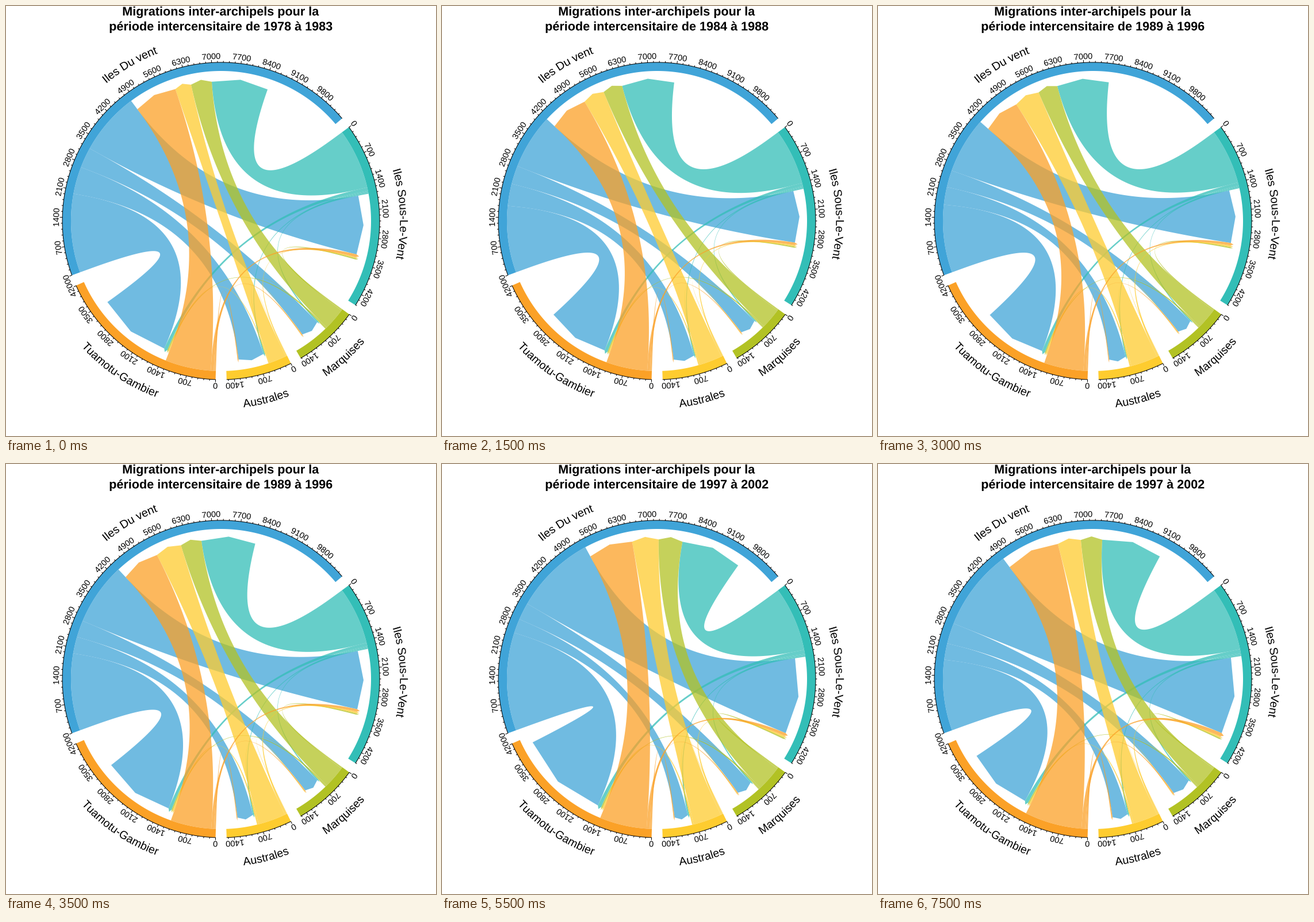
These frames come from a looping animation (748x748 px, 8000 ms). A matplotlib script:

```python
import numpy as np
import matplotlib.pyplot as plt
from matplotlib.animation import FuncAnimation
from matplotlib.collections import LineCollection
from matplotlib.patches import PathPatch
from matplotlib.path import Path
from matplotlib.textpath import TextPath

SIZE, MID = 748, 374
R_OUT, R_IN, R_SHOULDER, R_TIP = 276, 261, 242.8, 248
START, GAP = 200, 4
STEPS = 5  # frames from one census period to the next
SHARE = 0.0145  # pull of a sector on movers between outer islands, per thousand
FONT = "Liberation Sans"

NAMES = ["Iles Du vent", "Iles Sous-Le-Vent", "Marquises", "Australes", "Tuamotu-Gambier"]
COLORS = ["#40A4D8", "#33BEB7", "#B2C224", "#FECC2F", "#FBA127"]
THOUSANDS = np.array([10.49, 4.485, 1.564, 1.583, 4.205])
PERIODS = ["1978 à 1983", "1984 à 1988", "1989 à 1996", "1997 à 2002"]

# Flows with the hub (first sector) in degrees: sector -> value per period.
TO_HUB = {1: (23.3, 20.4, 25.1, 24.8), 2: (8.6, 7.6, 10.1, 8.8),
          3: (6.7, 10.2, 11.3, 9.6), 4: (17.7, 14.8, 17.3, 22.1)}
FROM_HUB = {1: (24.3, 19.3, 31.3, 31.6), 2: (7.9, 6.6, 6.3, 8.0),
            3: (10.5, 7.2, 5.3, 6.3), 4: (30.5, 22.7, 40.6, 27.4)}

N = len(NAMES)
SCALE = (360 - N * GAP) / THOUSANDS.sum() / 1000  # degrees per person
SPANS = THOUSANDS * 1000 * SCALE
STARTS = START - np.cumsum(SPANS + GAP) + SPANS + GAP


def polar(deg, r):
    a = np.radians(deg)
    return np.stack([MID + r * np.cos(a), MID - r * np.sin(a)], axis=-1)


def arc(a, b, r):
    n = max(2, int(abs(a - b) * 2))
    return polar(np.linspace(a, b, n), r)


def glyphs(text, size, weight="normal"):
    """Outline of the text, centred on x = 0 with its baseline at y = 0."""
    path = TextPath((0, 0), text, size=size,
                    prop={"family": FONT, "weight": weight})
    box = path.get_extents()
    return path.vertices - [(box.x0 + box.x1) / 2, 0], path.codes


def bent_text(text, deg, r, size, flip=False):
    verts, codes = glyphs(text, size)
    side = -1 if flip else 1
    angle = deg - side * np.degrees(verts[:, 0] / r)
    return Path(polar(angle, r + side * verts[:, 1]), codes)


def flat_text(text, y, size):
    verts, codes = glyphs(text, size, "bold")
    return Path(np.column_stack([MID + verts[:, 0], y - verts[:, 1]]), codes)


def add(path, color="black", **kw):
    return ax.add_patch(PathPatch(path, facecolor=color, lw=0, **kw))


def curve(a, b):
    """Quadratic curve between two angles that bends towards the centre."""
    p, q = polar(a, R_SHOULDER), polar(b, R_SHOULDER)
    t = np.linspace(0, 1, 60)[:, None]
    return (1 - t) ** 2 * p + 2 * t * (1 - t) * MID + t ** 2 * q


def ribbon(s0, s1, t0, t1):
    """The source end runs straight from the ring before the curve begins."""
    tip = polar((t0 + t1) / 2, R_TIP)[None]
    return Path(np.vstack([arc(s0, s1, R_IN), curve(s1, t0), tip, curve(t1, s0)]))


def flows(frame):
    time = frame / STEPS
    flow = np.zeros((N, N))
    for i in range(1, N):
        to_hub = np.interp(time, range(len(PERIODS)), TO_HUB[i])
        flow[i] = SHARE * THOUSANDS * to_hub
        flow[i, 0] = to_hub
        flow[0, i] = np.interp(time, range(len(PERIODS)), FROM_HUB[i])
    return flow


def ribbons(frame):
    """Each sector holds its outgoing flows first, then the incoming ones."""
    flow = flows(frame)
    source, target = {}, {}
    for i, pos in enumerate(STARTS):
        others = [(i - j) % N for j in range(1, N)]
        for ends, pairs in ((source, [(i, o) for o in others]),
                            (target, [(o, i) for o in others])):
            for pair in pairs:
                ends[pair] = (pos, pos - flow[pair])
                pos -= flow[pair]
    return [ribbon(*span, *target[pair]) for pair, span in source.items()]


def draw_sector(name, color, start, span):
    end = start - span
    ring = np.vstack([arc(start, end, R_OUT), arc(end, start, R_IN)])
    add(Path(ring), color, zorder=2)
    lines = [arc(start, end, R_OUT)]
    for value in range(0, int(span / SCALE) + 1, 140):
        deg = start - value * SCALE
        major = value % 700 == 0
        lines.append(polar(deg, np.array([R_OUT, R_OUT + (4.5 if major else 2.5)])))
        if major:
            add(bent_text(str(value), deg, 282, 14.4))
    ax.add_collection(LineCollection(lines, colors="black", lw=0.72, zorder=3))
    middle = start - span / 2
    flip = middle < 0
    add(bent_text(name, middle, 326.5 if flip else 311.5, 19.8, flip))


fig = plt.figure(figsize=(SIZE / 100, SIZE / 100), dpi=100, facecolor="white")
ax = fig.add_axes([0, 0, 1, 1])
ax.set_xlim(0, SIZE)
ax.set_ylim(SIZE, 0)
ax.axis("off")

for sector in zip(NAMES, COLORS, STARTS, SPANS):
    draw_sector(*sector)

add(flat_text("Migrations inter-archipels pour la", 16.5, 21.6))
headings = [flat_text(f"période intercensitaire de {p}", 42.5, 21.6) for p in PERIODS]
heading = add(headings[0])
links = [add(path, COLORS[i // (N - 1)], alpha=0.75, zorder=1)
         for i, path in enumerate(ribbons(0))]


def update(frame):
    heading.set_path(headings[-(-frame // STEPS)])
    for link, path in zip(links, ribbons(frame)):
        link.set_path(path)
    return [heading, *links]


anim = FuncAnimation(fig, update, frames=STEPS * (len(PERIODS) - 1) + 1,
                     interval=500, repeat=True, repeat_delay=0, blit=False)
plt.show()
```
